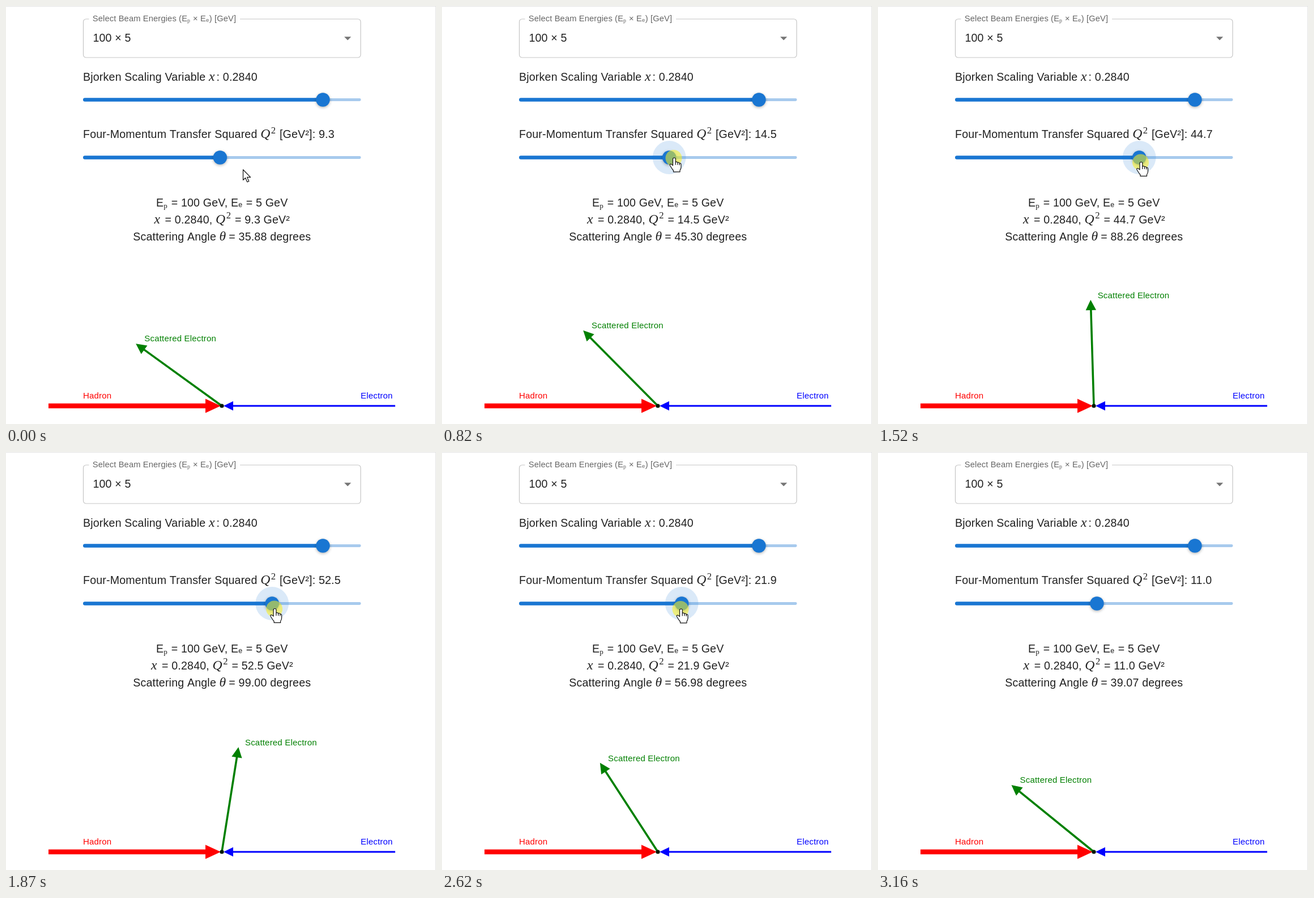
An HTML page with a canvas that plays this animation: 759 px wide and 738 px high, repeating every 3360 ms.

```html
<!DOCTYPE html>
<html lang="en">
<head>
<meta charset="utf-8">
<title>Electron scattering kinematics</title>
<style>
  html, body { margin: 0; width: 759px; height: 738px; overflow: hidden; background: #fff; }
  canvas { display: block; }
</style>
</head>
<body>
<canvas id="stage" width="759" height="738"></canvas>
<script>
const ctx = document.getElementById('stage').getContext('2d');

const LOOP = 3360;
const U = 1.225;                 // page zoom
const LEFT = 136.5, WIDTH = 400 * U;
const MID = 381.25;
const HIT = { x: 381, y: 706 };
const X = 0.284, EP = 100, EE = 5;
const BLUE = '#1976d2', INK = '#212121', GREY = '#666';
const SANS = '"Liberation Sans", Arial, sans-serif';
const SERIF = '"Liberation Serif", "Times New Roman", serif';

// The picture updates every 70 ms; a few updates come after 60 ms.
const SHORT = [7, 11, 28, 34, 38, 40];
const TICKS = [0];
for (let i = 0; i < 46; i++) TICKS.push(TICKS[i] + (SHORT.includes(i) ? 60 : 70));

// time, log10(Q²)
const DRAG = [
  [0, .97], [420, .97], [490, .96], [550, .96], [620, .94], [690, 1], [820, 1.16],
  [1100, 1.39], [1520, 1.65], [1800, 1.72], [1940, 1.72], [2210, 1.64],
  [2620, 1.34], [2750, 1.19], [2880, 1.09], [3020, 1.04], [3360, 1.04]
];
// time, pointer x, pointer y
const POINTER = [
  [0, 418, 288.5], [210, 394, 276], [350, 378, 269], [550, 376, 268], [620, 375, 268],
  [820, 409, 268.5], [1100, 434, 270], [1520, 463.5, 276], [1800, 477, 277],
  [2210, 457, 277], [2620, 421, 277.5], [2750, 403, 278], [3020, 385, 279], [3160, 390, 306]
];
const PRESS = 480, RELEASE = 3050, GONE = 3160;

const HAND = new Path2D('M-2.5 2Q-2.5-.5 0-.5Q2.3-.5 2.3 2V7Q5 5.8 6 8Q8.5 7 9.3 9.2Q12 8.6 12 11.5V16Q12 19 10 21.5V24.3H-1.5V22Q-4 19-6 15.5Q-8.5 12-7.5 11Q-5.5 9.5-2.5 13Z');
const KNUCKLES = new Path2D('M2.3 7V12M6 8V12M9.3 9.2V12.5');
const ARROW = new Path2D('M.5 .5V18.8L4.6 15L7.8 22.2L10.8 20.9L7.6 13.8H13.6Z');

function sample(keys, t, col) {
  let i = 1;
  while (i < keys.length - 1 && keys[i][0] < t) i++;
  const a = keys[i - 1], b = keys[i];
  const k = Math.min(1, Math.max(0, (t - a[0]) / (b[0] - a[0])));
  return a[col] + (b[col] - a[col]) * k;
}

// Text pieces: [string, size, family, fixed advance, baseline shift]
const txt = (s, size = 16 * U) => [s, size + 'px ' + SANS];
const math = (s, adv) => [s, 'italic 23.7px ' + SERIF, adv, 0];
const sup2 = ['2', '16.6px ' + SERIF, 9.5, -8.5];
const subP = k => ['p', 13 * k + 'px ' + SERIF, 7.7 * k, 2.5 * k];
const subE = k => ['e', 12.5 * k + 'px ' + SANS, 7.8 * k, 1.2 * k];

function measure(p) {
  ctx.font = p[1];
  return p[2] || ctx.measureText(p[0]).width;
}

function line(parts, x, y, color = INK, spacing = 0.184) {
  ctx.letterSpacing = spacing + 'px';
  ctx.fillStyle = color;
  for (const p of parts) {
    const w = measure(p);
    ctx.fillText(p[0], x, y + (p[3] || 0));
    x += w;
  }
}

function centred(parts, y) {
  ctx.letterSpacing = '0.184px';
  const w = parts.reduce((sum, p) => sum + measure(p), 0);
  line(parts, MID - w / 2, y);
}

function disc(x, y, r, color) {
  ctx.fillStyle = color;
  ctx.beginPath();
  ctx.arc(x, y, r, 0, Math.PI * 2);
  ctx.fill();
}

function bar(x, y, w, h, color) {
  ctx.fillStyle = color;
  ctx.beginPath();
  ctx.roundRect(x, y - h / 2, w, h, h / 2);
  ctx.fill();
}

function slider(y, part, halo) {
  const x = LEFT + WIDTH * part;
  bar(LEFT, y, WIDTH, 4 * U, '#a7caed');
  bar(LEFT - .5, y, x - LEFT, 5.4 * U, BLUE);
  if (halo) disc(x, y, halo * U, 'rgba(25,118,210,.16)');
  ctx.save();
  ctx.shadowColor = 'rgba(0,0,0,.3)';
  ctx.shadowBlur = 5;
  ctx.shadowOffsetY = 1.5;
  disc(x, y, 10 * U, BLUE);
  ctx.restore();
  return x;
}

// Line leaving (x, y) at the given angle, with a triangular head.
function arrow(x, y, angle, length, weight, head, half, color) {
  ctx.save();
  ctx.translate(x, y);
  ctx.rotate(angle);
  ctx.fillStyle = color;
  ctx.fillRect(0, -weight / 2, length - head + 1, weight);
  ctx.beginPath();
  ctx.moveTo(length, 0);
  ctx.lineTo(length - head, -half);
  ctx.lineTo(length - head, half);
  ctx.fill();
  ctx.restore();
}

function selectBox() {
  const l = LEFT, r = LEFT + WIDTH - .5, t = 23, b = 91, c = 4 * U;
  ctx.strokeStyle = 'rgba(0,0,0,.23)';
  ctx.lineWidth = 1.2;
  ctx.beginPath();
  ctx.moveTo(413, t);
  ctx.arcTo(r, t, r, b, c);
  ctx.arcTo(r, b, l, b, c);
  ctx.arcTo(l, b, l, t, c);
  ctx.arcTo(l, t, r, t, c);
  ctx.lineTo(146.5, t);
  ctx.stroke();

  const s = 12 * U, k = .75;
  line([txt('Select Beam Energies (E', s), subP(k), txt(' × E', s), subE(k), txt(') [GeV]', s)],
    152.8, 27, GREY, 0.138);
  line([txt('100 × 5')], 153.4, 63);

  ctx.fillStyle = 'rgba(0,0,0,.54)';
  ctx.beginPath();
  ctx.moveTo(597, 54.3);
  ctx.lineTo(609.2, 54.3);
  ctx.lineTo(603.1, 60.5);
  ctx.fill();
}

function pointer(x, y, pressed, overSlider) {
  if (pressed) disc(x, y, 14.5, 'rgba(250,240,30,.55)');
  ctx.save();
  ctx.translate(x, y);
  ctx.fillStyle = '#fff';
  ctx.strokeStyle = '#111';
  ctx.lineWidth = 1.2;
  ctx.lineJoin = 'round';
  if (overSlider) {
    ctx.translate(1, 0);
    ctx.fill(HAND);
    ctx.stroke(HAND);
    ctx.stroke(KNUCKLES);
  } else {
    ctx.fill(ARROW);
    ctx.stroke(ARROW);
  }
  ctx.restore();
}

function diagram(theta) {
  const { x, y } = HIT;
  arrow(75, y, 0, 304, 8.6, 27, 12.6, '#f00');
  arrow(687, y, Math.PI, 303, 3, 17, 8.3, '#00f');
  arrow(x, y, Math.PI + theta, 187.4, 3.6, 18.4, 9.2, '#008000');
  disc(x, y, 3.6, '#021a02');

  const len = 150 * U;
  const label = (s, lx, ly, color) => line([txt(s, 15)], lx, ly, color);
  label('Scattered Electron', x - len * Math.cos(theta) + 10 * U, y - len * Math.sin(theta) - 5 * U, '#008000');
  label('Hadron', 136, 693, '#f00');
  label('Electron', 626, 693, '#00f');
}

function draw(t) {
  const log = Math.round(sample(DRAG, t, 1) * 100) / 100;
  const q2 = 10 ** log;
  const y = q2 / (4 * EP * EE * X);
  const theta = 2 * Math.asin(Math.sqrt(q2 / (4 * EE * EE * (1 - y))));
  const q = q2.toFixed(1), deg = (theta * 180 / Math.PI).toFixed(2);

  ctx.fillStyle = '#fff';
  ctx.fillRect(0, 0, 759, 738);
  ctx.fillStyle = '#e4e4e4';
  ctx.fillRect(0, 0, 759, 1);
  ctx.fillRect(758, 0, 1, 738);

  selectBox();
  line([txt('Bjorken Scaling Variable '), math('x', 13.5), txt(': 0.2840')], 136, 132);
  line([txt('Four-Momentum Transfer Squared '), math('Q', 18.7), sup2, txt(' [GeV²]: ' + q)], 136, 233);

  const px = sample(POINTER, t, 1), py = sample(POINTER, t, 2);
  const pressed = t >= PRESS && t < RELEASE;
  const part = (log + 1) / 4;
  const near = t < GONE && Math.hypot(px - LEFT - WIDTH * part, py - 267.5) < 20;
  slider(165.5, 0.863, 0);
  slider(267.5, part, pressed ? 24 : near ? 18 : 0);

  centred([txt('E'), subP(1), txt(' = 100 GeV, E'), subE(1), txt(' = 5 GeV')], 354);
  centred([math('x', 13.5), txt(' = 0.2840, '), math('Q', 18.7), sup2, txt(' = ' + q + ' GeV²')], 383.5);
  centred([txt('Scattering Angle '), math('θ', 11.1), txt(' = ' + deg + ' degrees')], 413.5);

  diagram(theta);
  if (t < GONE) pointer(px, py, pressed, Math.abs(py - 267.5) < 18);
}

let start;
function loop(now) {
  if (start === undefined) start = now;
  const t = (now - start) % LOOP;
  draw(TICKS.filter(k => k <= t).pop() || 0);
  requestAnimationFrame(loop);
}
draw(0);
requestAnimationFrame(loop);
</script>
</body>
</html>
```
